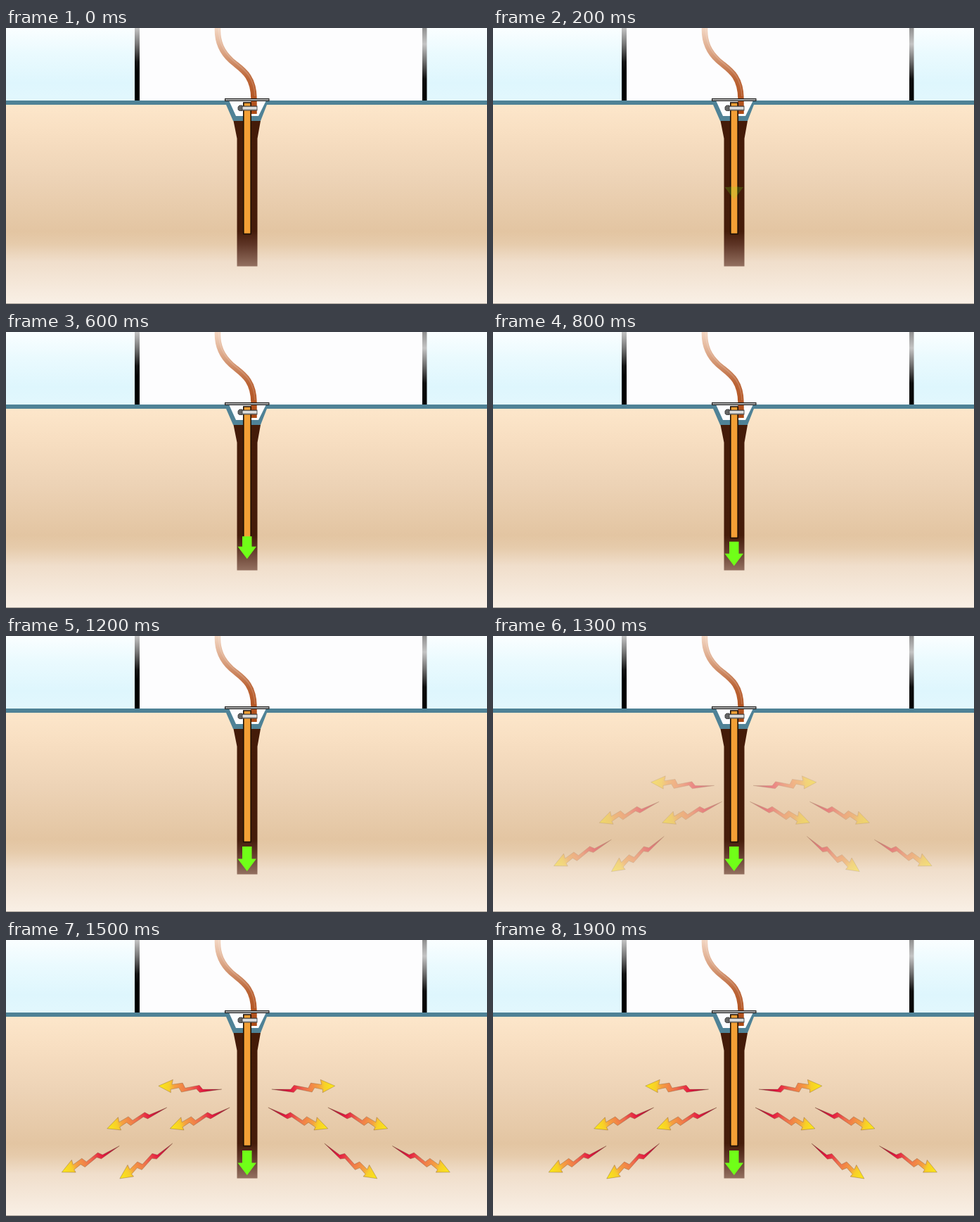
Write an HTML page that moves like this. It is 684 by 392 pixels and loops after 2300 ms.

```html
<!DOCTYPE html>
<html lang="en">
<head>
<meta charset="utf-8">
<title>Ground rod</title>
<style>
html, body { margin: 0; width: 100%; height: 100%; overflow: hidden; background: #fff; }
svg { display: block; width: 100%; height: 100%; }
</style>
</head>
<body>
<svg viewBox="0 0 684 392">
  <defs>
    <linearGradient id="sky" x2="0" y2="1">
      <stop offset="0" stop-color="#fafeff"/><stop offset=".35" stop-color="#eafafe"/>
      <stop offset=".75" stop-color="#def6fd"/><stop offset="1" stop-color="#e2f7fd"/>
    </linearGradient>
    <linearGradient id="sand" x2="0" y2="1">
      <stop offset="0" stop-color="#fde7cb"/><stop offset=".15" stop-color="#f8dfc2"/>
      <stop offset=".38" stop-color="#edd3b6"/><stop offset=".64" stop-color="#e3c5a2"/>
      <stop offset=".7" stop-color="#e6cbab"/><stop offset=".79" stop-color="#f0decb"/>
      <stop offset="1" stop-color="#f9f0e6"/>
    </linearGradient>
    <linearGradient id="postL" x2="0" y2="1">
      <stop offset="0" stop-color="#c4c4c4"/><stop offset=".22" stop-color="#777"/>
      <stop offset=".46" stop-color="#151515"/><stop offset=".6" stop-color="#000"/>
    </linearGradient>
    <linearGradient id="postR" x2="0" y2="1">
      <stop offset="0" stop-color="#909090"/><stop offset=".22" stop-color="#c4c4c4"/>
      <stop offset=".45" stop-color="#707070"/><stop offset=".7" stop-color="#0c0c0c"/>
      <stop offset="1" stop-color="#000"/>
    </linearGradient>
    <linearGradient id="cable" gradientUnits="userSpaceOnUse" x1="0" y1="0" x2="0" y2="122">
      <stop offset="0" stop-color="#f3d6c2"/><stop offset=".3" stop-color="#d9a180"/>
      <stop offset=".6" stop-color="#bb6436"/><stop offset="1" stop-color="#ad4a14"/>
    </linearGradient>
    <linearGradient id="hole" x2="0" y2="1">
      <stop offset="0" stop-color="#441b08"/><stop offset=".76" stop-color="#451c0a"/>
      <stop offset=".85" stop-color="#5e3526"/><stop offset="1" stop-color="#937060"/>
    </linearGradient>
    <linearGradient id="steel" x2="0" y2="1">
      <stop offset="0" stop-color="#777"/><stop offset=".4" stop-color="#f4f4f4"/>
      <stop offset="1" stop-color="#8a8a8a"/>
    </linearGradient>
    <linearGradient id="heat" gradientUnits="userSpaceOnUse" x1="0" y1="0" x2="90" y2="0">
      <stop offset="0" stop-color="#8e1030"/><stop offset=".3" stop-color="#e4173f"/>
      <stop offset=".5" stop-color="#ee6a4c"/><stop offset=".75" stop-color="#f5a040"/>
      <stop offset=".83" stop-color="#f7cf28"/><stop offset="1" stop-color="#fbea14"/>
    </linearGradient>
    <path id="bolt" fill="url(#heat)" stroke="#7d5a3c" stroke-opacity=".6" stroke-width=".6"
      d="M0 0L27 1.5L32-4L52 1L56-6L71-3L70-10L90 0L72 8.5L72.5 4L61 1L57 7L36 1.5L31 6Z"/>
  </defs>

  <rect width="684" height="392" fill="#fdfdfe"/>
  <rect width="184" height="104" fill="url(#sky)"/>
  <rect x="598" width="86" height="104" fill="url(#sky)"/>
  <rect y="106" width="684" height="286" fill="url(#sand)"/>
  <rect y="391" width="684" height="1" fill="#aaa29a"/>
  <rect x="183" width="7" height="104" fill="url(#postL)"/>
  <rect x="592" width="6.5" height="104" fill="url(#postR)"/>
  <path d="M0 103H684V109H371L362 132H323L313 109H0Z" fill="#4f8296"/>
  <path d="M317 103H370L359 125H327Z" fill="#fdfdfe"/>
  <path d="M323.500 132H362L357.500 157V338.500H328.500V157Z" fill="url(#hole)"/>

  <path id="wire" d="M301-1C300 20 307 34 320 46S352 65 352.500 100V122" fill="none" stroke="url(#cable)" stroke-width="8.500"/>
  <path d="M303-1C302 19 309 32 321 44S353 64 354 97" fill="none" stroke="#fff" stroke-opacity=".15" stroke-width="2"/>
  <rect x="337.800" y="106" width="10.400" height="186.500" fill="#f3a036" stroke="#1c0e04" stroke-width="1.600"/>
  <g stroke="#333" stroke-width=".8">
    <rect x="335" y="111" width="22" height="6" fill="url(#steel)"/>
    <path d="M330 112L332 110H336V117.500H332L330 116Z" fill="#666"/>
  </g>
  <rect x="311.500" y="100.500" width="62.500" height="3" fill="#aaa" stroke="#111"/>

  <g id="bolts"></g>
  <path id="arrow" fill="#70ff18"/>
</svg>
<script>
const LOOP = 2300, STEP = 100, MID = 342;
const bolts = document.getElementById('bolts');
const arrow = document.getElementById('arrow');

// tail x, tail y, angle in degrees, mirror axis
const rays = [
  [378, 212, -3, 342.3],
  [373, 238, 19.4, 345.5],
  [458, 238, 19.4, 343.3],
  [453, 289, 33.7, 344.8],
  [549.5, 292.5, 24.5, 355.3]
];

for (const [x, y, angle, axis] of rays) {
  for (const side of ['', `translate(${2 * axis} 0) scale(-1 1) `]) {
    const use = document.createElementNS('http://www.w3.org/2000/svg', 'use');
    use.setAttribute('href', '#bolt');
    use.dataset.base = `${side}translate(${x} ${y}) rotate(${angle})`;
    bolts.append(use);
  }
}

// soft start, long settling end
const settle = (time, tau) => time <= 0 ? 0 : 1 - Math.exp(-Math.pow(time / tau, 1.9));

function drawArrow(p) {
  const tip = 234 + 100 * p;
  const neck = tip - 17.5;
  const top = neck - 17.5 * Math.pow(p, 1.5);
  arrow.setAttribute('d', `M${MID - 6} ${top}H${MID + 7.5}V${neck}H${MID + 14}L${MID + .8} ${tip}L${MID - 12.5} ${neck}H${MID - 6}Z`);
  arrow.setAttribute('opacity', Math.min(1, p * 2));
}

function drawBolts(p) {
  bolts.setAttribute('opacity', p);
  for (const use of bolts.children) {
    use.setAttribute('transform', `${use.dataset.base} translate(${14 * (p - 1)} 0)`);
  }
}

function draw(now) {
  const t = Math.floor(now % LOOP / STEP) * STEP;
  drawArrow(settle(t - 100, 335));
  drawBolts(settle(t - 1200, 136));
}

const start = performance.now();
function tick() {
  draw(performance.now() - start);
  requestAnimationFrame(tick);
}
tick();
</script>
</body>
</html>
```
